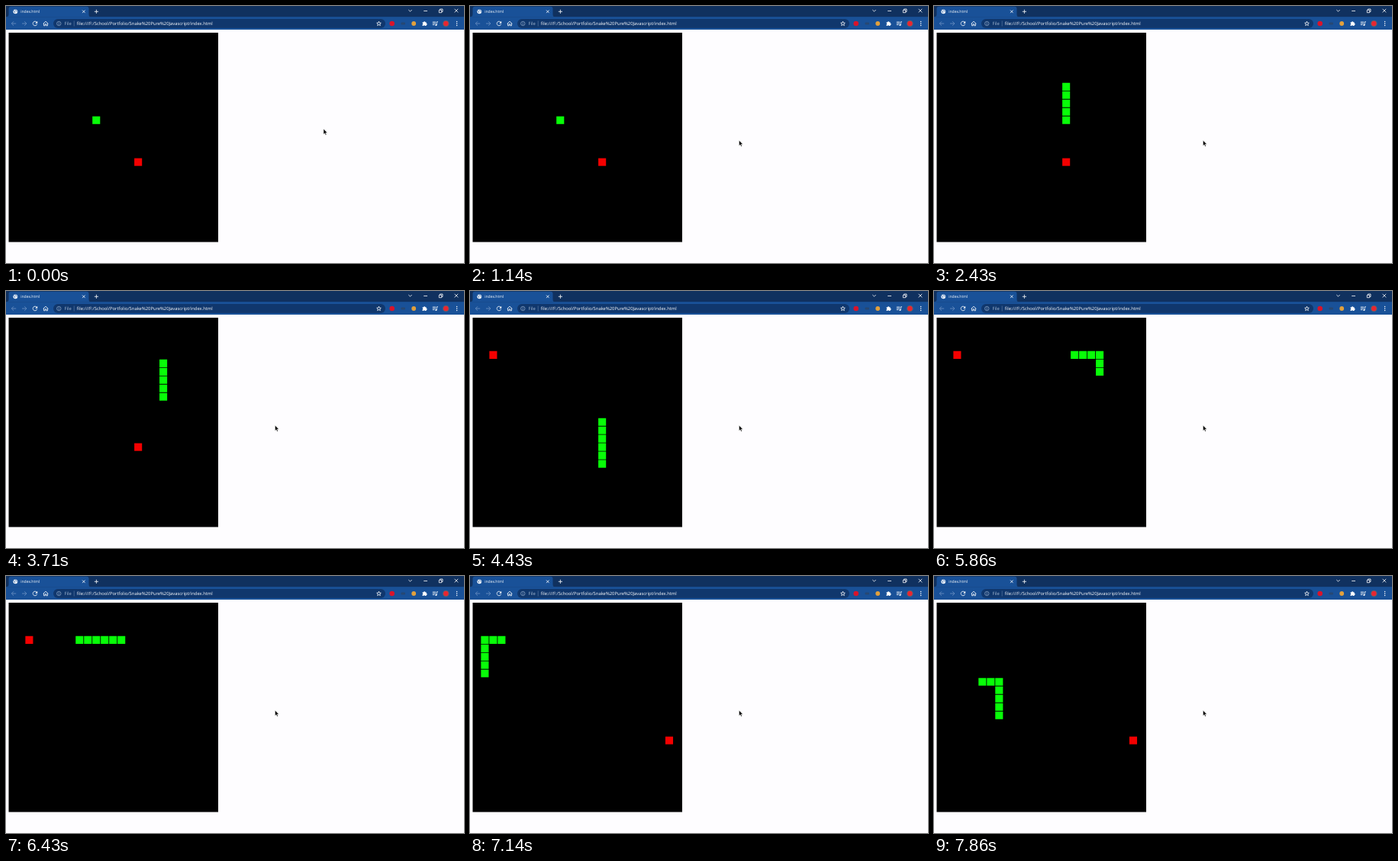
Animation, 600 px wide and 337 px high, one loop 8000 ms. Source, as an HTML page:

```html
<!DOCTYPE html>
<html lang="en">
<head>
<meta charset="utf-8">
<title>index.html</title>
<style>
  html, body { margin: 0; width: 100%; height: 100%; overflow: hidden; background: #fefdff; }
  svg { display: block; width: 100vw; height: 100vh; }
  text { font-family: "Open Sans", "Noto Sans", sans-serif; text-rendering: geometricPrecision; }
  .line { fill: none; stroke: #fff; stroke-width: .8; }
  .dim { stroke: #6f93c4; }
</style>
</head>
<body>
<svg viewBox="0 0 600 337" preserveAspectRatio="none">
  <rect width="600" height="337" fill="#fefdff"/>

  <!-- title bar, tab, toolbar -->
  <rect width="600" height="15" fill="#10315f"/>
  <path d="M0 14.3Q3.5 14.3 3.5 11V3.5Q3.5 .8 6.5 .8H105.500Q108.500 .8 108.500 3.500V11Q108.500 14.300 111 14.300Z" fill="#195198"/>
  <rect y="14.200" width="600" height="16.800" fill="#195198"/>
  <rect x="62" y="17" width="435" height="12" rx="6" fill="#10376d"/>

  <!-- tab contents -->
  <circle cx="12.300" cy="7.300" r="2.900" fill="#f2f6fb"/>
  <path d="M10 6.200L11.700 7.200L11.300 9.200M12.400 4.800L13.200 6.400L14.700 7.200" fill="none" stroke="#3c6cab" stroke-width=".8"/>
  <text x="19.200" y="9.300" font-size="5.050" fill="#fff">index.html</text>
  <path class="line" d="M100 5.500L103.600 9.100M103.600 5.500L100 9.100"/>
  <path class="line" d="M115.800 7.300H121M118.400 4.700V9.900" stroke-width="1"/>

  <!-- window buttons -->
  <path class="line" d="M527.300 5L529.500 7.200L531.700 5M547.200 6.500H552M587.600 3.800L592.200 8.400M592.200 3.800L587.600 8.400"/>
  <path class="line" d="M567.300 5.300H570.700V8.700H567.300ZM568.500 5V4H572V7.500H571" stroke-width=".7"/>

  <!-- navigation -->
  <path class="line dim" d="M13.200 23H7.400M10 20.300L7.300 23L10 25.700"/>
  <path class="line dim" d="M21 23H26.800M24.200 20.300L26.900 23L24.200 25.700"/>
  <path class="line" d="M40.200 21.200A2.800 2.800 0 1 0 40.700 23.800" stroke-width="1"/>
  <path d="M41.200 19.800V22.700H38.300Z" fill="#fff"/>
  <path class="line" d="M48.700 23.200L52 20.200L55.300 23.200M49.600 22.800V25.800H51.200V23.800H52.800V25.800H54.400V22.800" stroke-width="1"/>

  <!-- address -->
  <circle class="line" cx="69.300" cy="23" r="2.700" style="stroke:#a9bfdb;stroke-width:.6"/>
  <path d="M69.300 22.600V24.600M69.300 21.300V22" stroke="#a9bfdb" stroke-width=".7"/>
  <text x="76.600" y="25.100" font-size="5.850" fill="#a3b8d3">File</text>
  <path d="M89.200 19.500V26.500" stroke="#6685ad" stroke-width=".6"/>
  <text x="92.800" y="25.100" font-size="5.850" fill="#fff">file:///F:/School/Portfolio/Snake%20Pure%20Javascript/index.html</text>
  <path class="line" d="M488.500 20.200L489.300 22.100L491.300 22.300L489.800 23.600L490.300 25.600L488.500 24.500L486.700 25.600L487.200 23.600L485.700 22.300L487.700 22.100Z" stroke-width=".6"/>

  <!-- extensions and menu -->
  <circle cx="505.700" cy="23" r="3.300" fill="#d9142b"/>
  <rect x="517.500" y="21.500" width="5.500" height="3" rx="1" fill="#274873"/>
  <circle cx="534.200" cy="23" r="2.900" fill="#e2a03c"/>
  <path d="M545.600 21.300H547.100A1.100 1.100 0 0 1 549.300 21.300H550.600V22.700A1.100 1.100 0 0 1 550.600 24.900V26H548.900A1 1 0 0 0 547 26H545.600V24.300A1 1 0 0 0 545.600 22.500Z" fill="#fff"/>
  <path class="line" d="M558.800 21H563M558.800 22.800H563M558.800 24.600H561.500M564.200 25V20.800H566"/>
  <circle cx="563.400" cy="25" r="1.100" fill="#fff"/>
  <circle cx="576.300" cy="23" r="4.300" fill="#59616f"/>
  <circle cx="576.300" cy="23" r="3.200" fill="#ea2630"/>
  <g fill="#fff"><circle cx="590.600" cy="20.600" r=".75"/><circle cx="590.600" cy="23" r=".75"/><circle cx="590.600" cy="25.400" r=".75"/></g>

  <!-- game -->
  <rect x="3.500" y="35" width="274.500" height="274.500"/>
  <path id="snake" fill="#08fd08"/>
  <path id="apple" fill="#f40000"/>
  <path id="cursor" d="M0 0V7L1.600 5.500L2.700 8L3.800 7.500L2.700 5.100H4.900Z" fill="#000" stroke="#fff" stroke-width=".4"/>
</svg>
<script>
const LOOP = 8000, FPS = 7;
const START = 1790.85, STEP = 65.5;
const CELL = 10.98, FILL = 10.1;
const TURNS = { R: [1, 0], L: [-1, 0], U: [0, -1], D: [0, 1] };
const route = "R5 U8 R6 D2 L3 D7 L3 D7 R4 U14 L18 D5 R6 D4";
const apples = [[15, 15], [2, 4], [23, 16]];

const trail = [[10, 10]];
for (const leg of route.split(" ")) {
  const [dx, dy] = TURNS[leg[0]];
  for (let n = +leg.slice(1); n > 0; n--) {
    const [x, y] = trail[trail.length - 1];
    trail.push([x + dx, y + dy]);
  }
}
const meals = apples.slice(0, 2).map(([ax, ay]) =>
  trail.findIndex(([x, y]) => x === ax && y === ay));

const el = id => document.getElementById(id);
const snake = el("snake"), apple = el("apple"), cursor = el("cursor");

const box = ([x, y]) =>
  `M${(3.4 + x * CELL).toFixed(2)} ${(34.9 + y * CELL).toFixed(2)}h${FILL}v${FILL}h${-FILL}z`;

const mark = n => Math.round(n * 100 / FPS) * 10;
function frameAt(t) {
  let n = Math.floor(t * FPS / 1000) + 1;
  while (mark(n) > t) n--;
  return n;
}

function draw(t) {
  const n = frameAt(t);
  const k = Math.min(trail.length - 1, Math.max(0, Math.floor((mark(n) - START) / STEP)));
  const size = 5 + meals.filter(m => k > m).length;
  snake.setAttribute("d", trail.slice(Math.max(0, k - size + 1), k + 1).map(box).join(""));
  apple.setAttribute("d", box(apples[meals.filter(m => k >= m).length]));

  const p = 1 - (1 - Math.min(1, n / 4)) ** 2;
  const x = 416 - 63.5 * p, y = 161.2 + 15 * p + 30 * p * (1 - p);
  cursor.setAttribute("transform", `translate(${x} ${y})`);
}

function tick() {
  draw(performance.now() % LOOP);
  requestAnimationFrame(tick);
}
tick();
</script>
</body>
</html>
```
